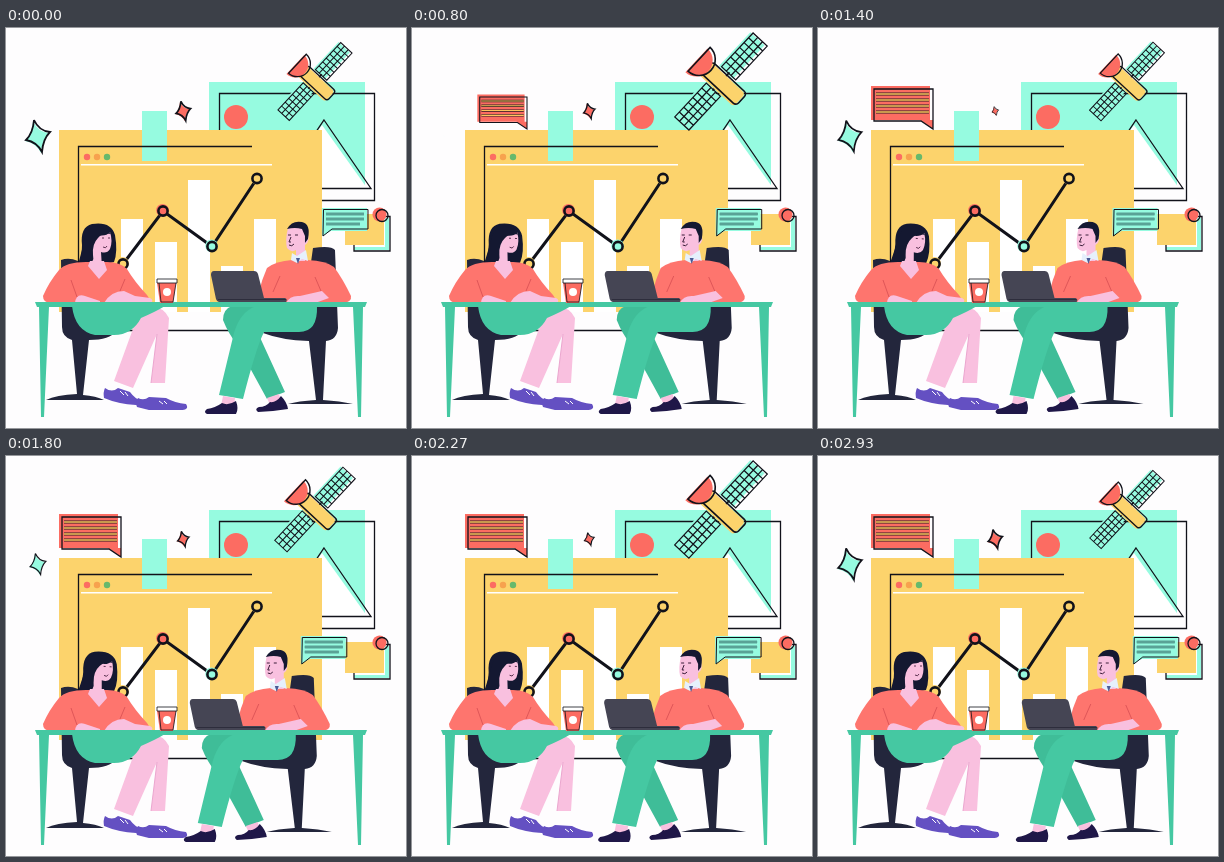
Write an HTML page that moves like this. It is 400 px wide and 400 px high and loops after 3000 ms.

```html
<!DOCTYPE html>
<html lang="en">
<head>
<meta charset="utf-8">
<title>Office meeting</title>
<style>
  html, body { margin: 0; width: 100%; height: 100%; overflow: hidden; background: #fefdfe; }
  svg { display: block; width: 100vw; height: 100vh; }
  .ink { fill: none; stroke: #11121a; stroke-width: 1.3; }
  .mint { fill: #96fbe0; }
  .red { fill: #fc6c62; }
  .sun { fill: #fcd36c; }
  .teal { fill: #45c8a2; }
  .shade { fill: #3fbd98; }
  .top { fill: #fe756e; }
  .skin { fill: #f9c0df; }
  .dark { fill: #23263c; }
  .hair { fill: #141831; }
  .white { fill: #fff; }
</style>
</head>
<body>
<svg viewBox="0 0 400 400">
  <defs>
    <path id="spark" d="M-4-16Q1-5 12-4Q5 3 4 16Q-1 6-12 4Q-5-3-4-16Z"/>
    <path id="noteLines" d="M-57-35H-4M-57-29H-4M-57-23H-4M-57-17H-4"/>
    <path id="talkLines" d="M320 186H358M320 191H358M320 196H354"/>
  </defs>

  <!-- picture card -->
  <path class="mint" d="M203 54H359V160H203Z"/>
  <circle class="red" cx="230" cy="89" r="12"/>
  <path class="white" d="M316 97L361 160H270Z"/>
  <path class="ink" d="M213.500 65.500H368.500V172.500H213.500ZM318 92L365 160.500H272Z"/>

  <!-- chart board -->
  <path class="sun" d="M53 102H316V284H53Z"/>
  <path class="mint" d="M136 83H161V133H136Z"/>
  <path class="white" d="M75 136H266V137.500H75Z"/>
  <g id="bars" class="white"></g>
  <path class="ink" d="M246 118.500H72.500V302.500H262"/>
  <circle class="red" cx="81" cy="129" r="3.200"/>
  <circle cx="91" cy="129" r="3.200" fill="#f7a24e"/>
  <circle cx="101" cy="129" r="3.200" fill="#67b96c"/>
  <path d="M117 236L157 183L206 218.500L251 150.500" fill="none" stroke="#11121a" stroke-width="3"/>
  <g id="nodes" stroke="#11121a" stroke-width="2.600"></g>

  <!-- stacked notes -->
  <path class="mint" d="M348 190H383V222H348Z"/>
  <path class="white" d="M348 190H379V219H348Z"/>
  <path class="sun" d="M339 186H378V217H339Z"/>
  <path class="ink" d="M378 188.500H384V223H348V217"/>
  <circle class="red" cx="373.500" cy="186.500" r="7"/>
  <circle class="ink" cx="376" cy="187.500" r="6"/>

  <g id="satellite">
    <g transform="rotate(-47)">
      <g id="panels"></g>
      <path class="ink" d="M-10 0H10"/>
      <rect class="sun" x="-8" y="-17" width="14" height="38" rx="3"/>
      <rect class="ink" x="-6" y="-16" width="13" height="38" rx="3"/>
      <path class="red" d="M-14-26H12A13 13 0 0 1-14-26Z"/>
      <path class="ink" d="M-12-25H14A13 13 0 0 1-12-25Z"/>
    </g>
  </g>

  <g id="bigSpark">
    <use href="#spark" class="mint" x="-1" y="1"/>
    <use href="#spark" class="ink" style="stroke-width:1.8"/>
  </g>
  <g id="smallSpark">
    <use href="#spark" class="red" x="-1.500" y="1"/>
    <use href="#spark" class="ink" style="stroke-width:2.800"/>
  </g>

  <g id="note">
    <path class="red" d="M-62-43H-3V-9H0L0 0L-13-9H-62Z"/>
    <path class="ink" d="M-59-40H0V0L-12-8H-59Z"/>
    <use href="#noteLines" stroke="#2c1a20" stroke-width="3"/>
    <use href="#noteLines" stroke="#fcc45e" stroke-width="1.300"/>
  </g>

  <!-- woman -->
  <g>
    <path class="dark" d="M55 232Q63 229 72 233L78 279L110 303Q104 312 83 312L77 367Q90 368 98 372H40Q50 367 71 366L66 312Q56 309 56 299Z"/>
    <path class="skin" d="M132 287L108 353L127 360L151 306L145 355H159L163 290Q157 278 145 279Z"/>
    <path d="M151 306L145 355" stroke="#eba6cf" fill="none"/>
    <path class="teal" d="M66 278H159Q151 283 135 290Q126 307 108 307H89Q69 303 66 278Z"/>
    <g fill="#6450c2">
      <path d="M99 360Q106 365 112 360L124 364Q129 371 136 373Q137 377 130 377Q112 376 98 370Q97 364 99 360Z"/>
      <path d="M132 370Q138 373 143 369L160 370Q169 375 180 376Q184 382 174 382H143L131 379Q129 374 132 370Z"/>
    </g>
    <path d="M114 363l4 4M119 364l3 4M153 373l4 3M158 373l3 3" stroke="#fff"/>
    <g id="head">
      <path class="hair" d="M86 196Q74 199 76 217Q76 230 72 236L92 238L108 234Q112 224 109 207Q105 193 86 196Z"/>
      <path class="skin" d="M88 206Q99 210 104 204Q107 213 104 221Q101 226 95 224L96 240H85L86 221Q81 217 83 212Z"/>
      <path d="M96 210h2M102 210h2M97 219q3 2 4-1" stroke="#4a2240" fill="none" stroke-width=".9"/>
      <path class="hair" d="M85 199Q99 197 105 206Q97 204 92 210Q86 216 87 227Q89 235 80 237H72Q77 218 80 206Z"/>
    </g>
    <path class="top" d="M80 234Q60 234 53 242Q43 254 37 268Q37 275 45 275H139Q146 273 141 267Q128 253 121 241Q114 234 101 234Z"/>
    <path class="skin" d="M84 233L82 238L93 251L101 242L98 233ZM69 275Q70 265 79 268L94 273V275ZM98 275Q105 263 118 263L129 268L144 270Q148 272 145 275Z"/>
    <path d="M65 252L71 269M119 251L114 263" stroke="#df5658" fill="none"/>
  </g>

  <!-- man, drawn at the right end of his path -->
  <g id="man">
    <path class="dark" d="M307 220Q325 217 329 222L332 300Q331 312 320 313L317 372Q334 373 347 376H282Q292 373 310 372L303 313Q275 312 257 305L280 279L300 270Z"/>
    <path class="shade" d="M226 278Q217 281 217 292Q222 305 232 318L261 371L279 364L252 305L262 278Z"/>
    <path class="teal" d="M311 278Q312 304 293 304L258 304Q250 320 237 371L213 367L228 305Q234 284 250 278Z"/>
    <path class="skin" d="M217 368L229 370L228 378H215ZM261 370L273 366L275 374L265 379Z"/>
    <g fill="#1f1748">
      <path d="M216 375Q222 378 230 373Q233 381 230 386H201Q197 384 201 381Q209 380 216 375Z"/>
      <path d="M264 374Q270 375 275 368Q281 374 282 381L267 383L252 384Q248 381 253 379Q260 379 264 374Z"/>
    </g>
    <path class="top" d="M286 232Q270 233 261 240Q256 251 253 264L257 275H337Q346 274 345 268Q337 251 328 239Q321 233 301 232Z"/>
    <path d="M309 249L315 263M274 248L267 264" stroke="#df5658" fill="none"/>
    <path class="skin" d="M280 275Q284 267 294 268L316 263L323 270L309 275Z"/>
    <path class="skin" d="M282 200Q279 212 281 220Q285 225 290 222V233H299V217Q305 213 301 204L296 197Z"/>
    <path class="hair" d="M281 201Q286 192 296 194Q305 196 302 211L299 215V208L296 201Q289 199 281 201Z"/>
    <path d="M282 207h3M289 207h3M283 217q3 2 5-1M285 209l-2 5h2" stroke="#3a1c38" fill="none"/>
    <path d="M286 225L291 228L300 222L302 233L296 231L291 235L285 232Z" fill="#e6f0fc"/>
    <path d="M290 230l2 6 2-6z" fill="#4a5b97"/>
    <path class="mint" d="M316 180H361V203H325L316 208Z"/>
    <path class="ink" d="M317.500 181.500H362V201H326L317 208Z" style="stroke-width:1"/>
    <use href="#talkLines" stroke="#1d4a4c" stroke-width="2.600"/>
    <use href="#talkLines" stroke="#96fbe0" stroke-width="1"/>
  </g>

  <!-- table -->
  <path class="teal" d="M29 274H361L359 279H357L355 389H352L347 279H43L38 389H35L33 279H31Z"/>

  <!-- cup -->
  <path class="red" d="M151 255H170L167 275H154Z"/>
  <path class="white" d="M150 250H170V255H150Z"/>
  <circle class="white" cx="161" cy="264" r="4"/>
  <path class="ink" d="M151 251H171V255H151ZM153 255L155 274H167L170 255" style="stroke-width:.8"/>

  <g id="laptop">
    <path d="M208 243H248Q251 243 252 246L258 270H279Q282 271 280 274H213Q211 274 210 271L205 247Q205 243 208 243Z" fill="#454554"/>
    <path d="M212 271.500H280" stroke="#2d2d3c"/>
  </g>
</svg>
<script>
  const LOOP = 3000;
  const $ = id => document.getElementById(id);

  const bars = [[115, 191], [149, 214], [182, 152], [215, 238], [248, 191]];
  $('bars').innerHTML = bars.map(([x, y]) => `<path d="M${x} ${y}h22V284h-22Z"/>`).join('');

  const nodes = [[117, 236, '#fcd36c'], [157, 183, '#fc6c62'], [206, 218.5, '#96fbe0'], [251, 150.5, '#fcd36c']];
  $('nodes').innerHTML = nodes.map(([x, y, fill]) =>
    `<circle cx="${x - 0.5}" cy="${y - 0.8}" r="6.300" fill="${fill}" stroke="none"/>
     <circle cx="${x}" cy="${y}" r="4.600" fill="${fill}"/>`).join('');

  // One solar panel: a 3 x 7 grid with a tinted backing.
  function panel(x) {
    const w = 37, h = 15.5;
    let grid = `M${x} ${-h / 2}h${w}v${h}h${-w}Z`;
    for (let i = 1; i < 7; i++) grid += `M${x + i * w / 7} ${-h / 2}v${h}`;
    for (let i = 1; i < 3; i++) grid += `M${x} ${-h / 2 + i * h / 3}h${w}`;
    return `<rect class="mint" x="${x - 1}" y="${-h / 2 - 2}" width="${w}" height="${h}"/>
            <path class="ink" d="${grid}" style="stroke-width:1"/>`;
  }
  $('panels').innerHTML = panel(9) + panel(-46);

  // Smooth swing 0 -> 1 -> 0 over one period.
  const swing = (t, period) => (1 - Math.cos(2 * Math.PI * t / period)) / 2;

  // Steady move out, short rest, steady move back.
  const glide = t => Math.min(t / 1500, 1, (LOOP - t) / 1300);

  function place(id, x, y, scale = 1) {
    $(id).setAttribute('transform', `translate(${x} ${y}) scale(${scale})`);
  }

  function draw(t) {
    const pulse = swing(t, LOOP / 2);
    const shift = -23 * glide(t);
    place('man', shift, 0);
    place('laptop', shift, 0);
    place('satellite', 309, 53.5, 1 + 0.25 * pulse);
    place('bigSpark', 32, 108, 1 - pulse);
    place('smallSpark', 177.3, 83, 0.6 * (1 - 0.6 * swing(t, LOOP / 3)));
    place('note', 115, 101, Math.min(1, t / 1000));
    $('head').setAttribute('transform', `rotate(${4 * swing(t, LOOP)} 91 236)`);
  }

  const start = performance.now();
  function tick() {
    draw((performance.now() - start) % LOOP);
    requestAnimationFrame(tick);
  }
  draw(0);
  requestAnimationFrame(tick);
</script>
</body>
</html>
```
